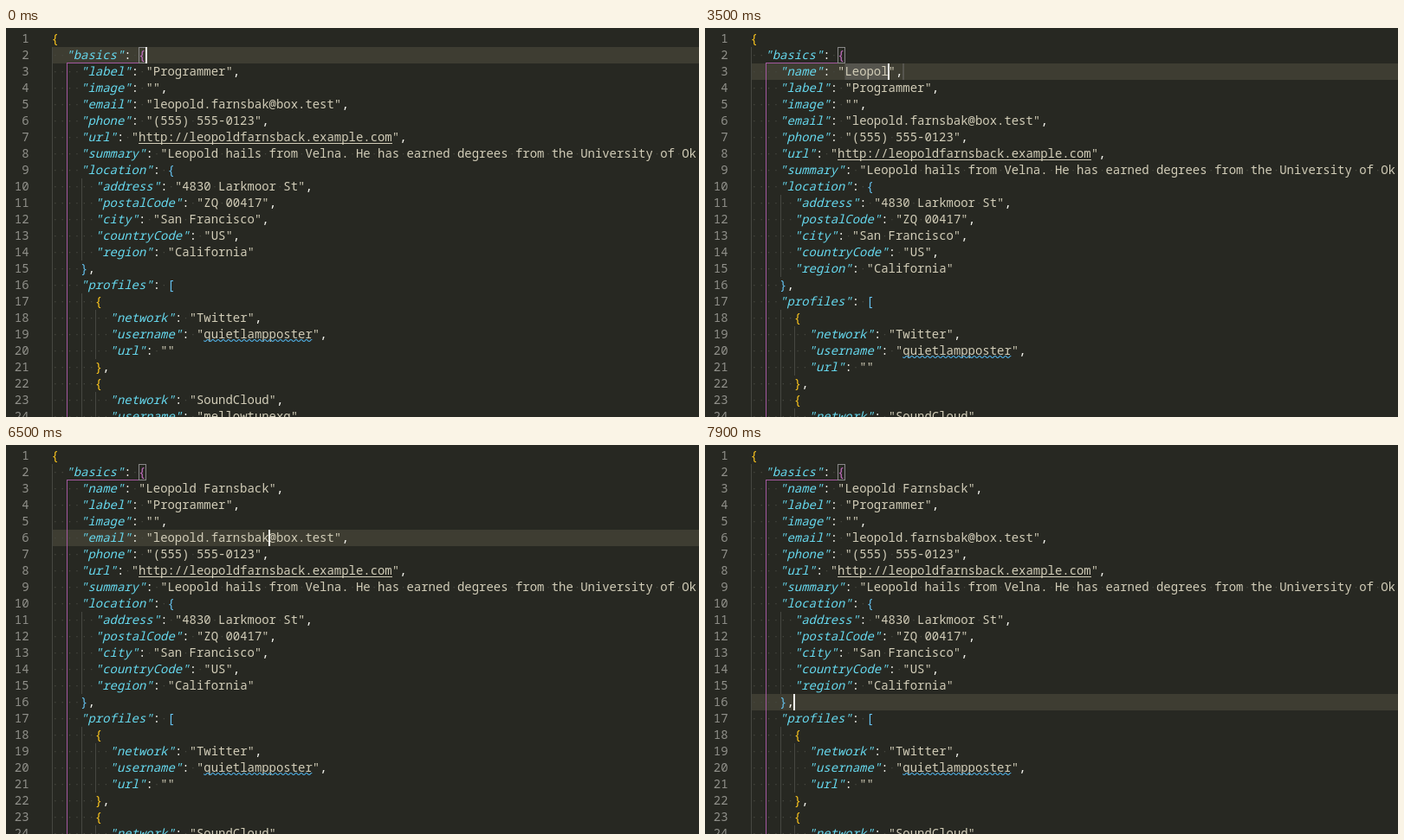
An HTML page with a canvas for the animation above (8000 ms loop, 800 by 450 pixels).

```html
<!DOCTYPE html>
<html lang="en">
<head>
<meta charset="utf-8">
<title>JSON editor</title>
<style>
  html, body { margin: 0; width: 100%; height: 100%; overflow: hidden; background: #272822; }
  canvas { display: block; }
</style>
</head>
<body>
<canvas id="stage" width="800" height="450"></canvas>
<script>
const ctx = document.getElementById('stage').getContext('2d');
const LOOP = 8000, TICK = 100;
const LEFT = 52.6, CHAR = 8.37, LINE = 19, TOP = 3;
const FONT = '13.95px "Roboto Mono", "Noto Sans Mono", "DejaVu Sans Mono", monospace';
const COLOR = {
  bg: '#272822', band: '#3e3d32', number: '#90908a', key: '#66d9ef',
  value: '#d2cdb8', plain: '#f8f8f2', dot: '#46473f', guide: '#464741',
  scope: '#a3589f', inner: '#668a96', box: '#888888', wave: '#4ba3d3',
  field: 'rgba(124,124,124,.38)', popup: '#414339', edge: '#75715e', icon: '#c5c5bd'
};
const BRACKETS = ['#ffc81e', '#c76fc4', '#66c4f2'];

const INSERT = 400, GUIDE = 700, POPUP = 1200, ACCEPT = 1700, TYPE = 2400, DONE = 6000, WALK = 6200;
const LETTER_MS = 206, ROW_MS = 133, BLINK_MS = 500;

const NAME = 'Leopold Farnsback';
const BASE = `{
  "basics": {
    "label": "Programmer",
    "image": "",
    "email": "leopold.farnsbak@box.test",
    "phone": "(555) 555-0123",
    "url": "http://leopoldfarnsback.example.com",
    "summary": "Leopold hails from Velna. He has earned degrees from the University of Ok
    "location": {
      "address": "4830 Larkmoor St",
      "postalCode": "ZQ 00417",
      "city": "San Francisco",
      "countryCode": "US",
      "region": "California"
    },
    "profiles": [
      {
        "network": "Twitter",
        "username": "quietlampposter",
        "url": ""
      },
      {
        "network": "SoundCloud",
        "username": "mellowtunexq",`.split('\n');

const colX = col => LEFT + col * CHAR;
const rowY = row => TOP + (row - 1) * LINE;
const within = (t, a, b) => t >= a && t < b;
const steps = (t, start, ms) => Math.max(0, Math.floor((t - start) / ms));

function rect(x, y, w, h, color) {
  ctx.fillStyle = color;
  ctx.fillRect(x, y, w, h);
}

function frame(x, y, w, h, color) {
  ctx.strokeStyle = color;
  ctx.lineWidth = 1;
  ctx.strokeRect(x + .5, y + .5, w - 1, h - 1);
}

function text(str, x, y, color, italic) {
  ctx.font = (italic ? 'italic ' : '') + FONT;
  ctx.fillStyle = color;
  ctx.fillText(str, x, y);
}

function wave(x, y, w) {
  ctx.beginPath();
  for (let i = 0; i <= w; i++) ctx.lineTo(x + i, y + Math.sin(i * Math.PI / 3) * 1.2);
  ctx.strokeStyle = COLOR.wave;
  ctx.lineWidth = 1.1;
  ctx.stroke();
}

function stateAt(t) {
  const lines = BASE.slice();
  if (t < INSERT) return { lines, row: 2, col: 13, caret: true };
  const accepted = t >= ACCEPT;
  const typed = t < TYPE ? 0 : Math.min(NAME.length, 1 + steps(t, TYPE, LETTER_MS));
  const row = t < WALK ? 3 : 4 + steps(t, WALK, ROW_MS);
  lines.splice(2, 0, accepted ? `    "name": "${NAME.slice(0, typed)}",` : '    ');
  const wanted = accepted ? 13 + typed : 4;
  const idle = t < TYPE ? t - (accepted ? ACCEPT : INSERT) : 0;
  return {
    lines, row, typed,
    col: Math.min(wanted, lines[row - 1].length),
    caret: steps(idle, 0, BLINK_MS) % 2 === 0,
    popup: within(t, POPUP, ACCEPT),
    snippet: within(t, ACCEPT, DONE),
    gap: t < GUIDE,
    inLocation: row >= 10 && row <= 15
  };
}

function drawGuides(s) {
  s.lines.forEach((line, i) => {
    const row = i + 1, indent = line.search(/\S|$/);
    for (let col = 0; col < indent; col += 2) {
      if (col === 2 && s.gap && row === 3) continue;
      const active = col === 4 && s.inLocation && within(row, 11, 16);
      const color = col === 2 ? COLOR.scope : active ? COLOR.inner : COLOR.guide;
      rect(Math.ceil(colX(col)), rowY(row), 1, LINE, color);
    }
  });
  rect(70, rowY(3) - 1, 90, 1, COLOR.scope);
}

function drawLines(lines) {
  let depth = 0;
  lines.forEach((line, i) => {
    const y = rowY(i + 1);
    for (const m of line.matchAll(/"[^"]*"?|[{}[\]]|[:,]/g)) {
      const part = m[0], x = colX(m.index), inside = (part.length - 2) * CHAR;
      const isKey = part[0] === '"' && line[m.index + part.length] === ':';
      let color = COLOR.plain;
      if (part[0] === '"') color = isKey ? COLOR.key : COLOR.value;
      else if ('{['.includes(part)) color = BRACKETS[depth++ % 3];
      else if ('}]'.includes(part)) color = BRACKETS[--depth % 3];
      text(part, x, y + 14, color, isKey);
      if (part.startsWith('"http')) rect(x + CHAR, y + 16, inside, 1, COLOR.value);
      if (part === '"quietlampposter"') wave(x + CHAR, y + 16.5, inside);
    }
    for (const m of line.matchAll(/ /g)) {
      rect(colX(m.index + .5) - .6, y + 9, 1.3, 1.3, COLOR.dot);
    }
  });
}

function drawNumbers() {
  ctx.textAlign = 'right';
  for (let row = 1; row <= 24; row++) text(row, 26.5, rowY(row) + 14, COLOR.number);
  ctx.textAlign = 'left';
}

function drawBoxes(s) {
  const box = (row, col) => frame(Math.floor(colX(col)), rowY(row), 9, LINE, COLOR.box);
  if (s.inLocation) {
    box(10, 16);
    box(16, 4);
  } else {
    box(2, 12);
  }
}

function drawSnippet(typed) {
  rect(colX(13), rowY(3), Math.max(2, typed * CHAR), LINE, COLOR.field);
  rect(Math.floor(colX(15 + typed)), rowY(3), 2, LINE, COLOR.field);
}

// An outlined handle with an open ring at its upper right end.
function drawWrench(x, y) {
  ctx.save();
  ctx.translate(x, y);
  ctx.rotate(-Math.PI / 4);
  ctx.beginPath();
  ctx.arc(5, 0, 4, .5, Math.PI - .4);
  ctx.lineTo(-7, 1.6);
  ctx.arc(-7, 0, 1.6, Math.PI / 2, -Math.PI / 2);
  ctx.arc(5, 0, 4, Math.PI + .4, -.5);
  ctx.lineTo(5, -1.5);
  ctx.lineTo(5, 1.5);
  ctx.closePath();
  ctx.strokeStyle = COLOR.icon;
  ctx.lineWidth = 1.1;
  ctx.stroke();
  ctx.restore();
}

function drawPopup() {
  const y = rowY(4);
  rect(87, y, 430, LINE, COLOR.popup);
  frame(87, y, 430, LINE, COLOR.edge);
  drawWrench(97.5, y + 11);
  text('name', 110, y + 15, COLOR.plain);
}

function draw(t) {
  const s = stateAt(t);
  rect(0, 0, 800, 450, COLOR.bg);
  rect(54, rowY(s.row), 746, LINE, COLOR.band);
  if (s.snippet) drawSnippet(s.typed);
  drawGuides(s);
  drawNumbers();
  drawLines(s.lines);
  drawBoxes(s);
  if (s.caret) rect(Math.floor(colX(s.col)), rowY(s.row), 2, LINE, COLOR.plain);
  if (s.popup) drawPopup();
}

const start = performance.now();
function tick() {
  const t = (performance.now() - start) % LOOP;
  draw(Math.floor(t / TICK) * TICK);
  requestAnimationFrame(tick);
}
tick();
</script>
</body>
</html>
```
